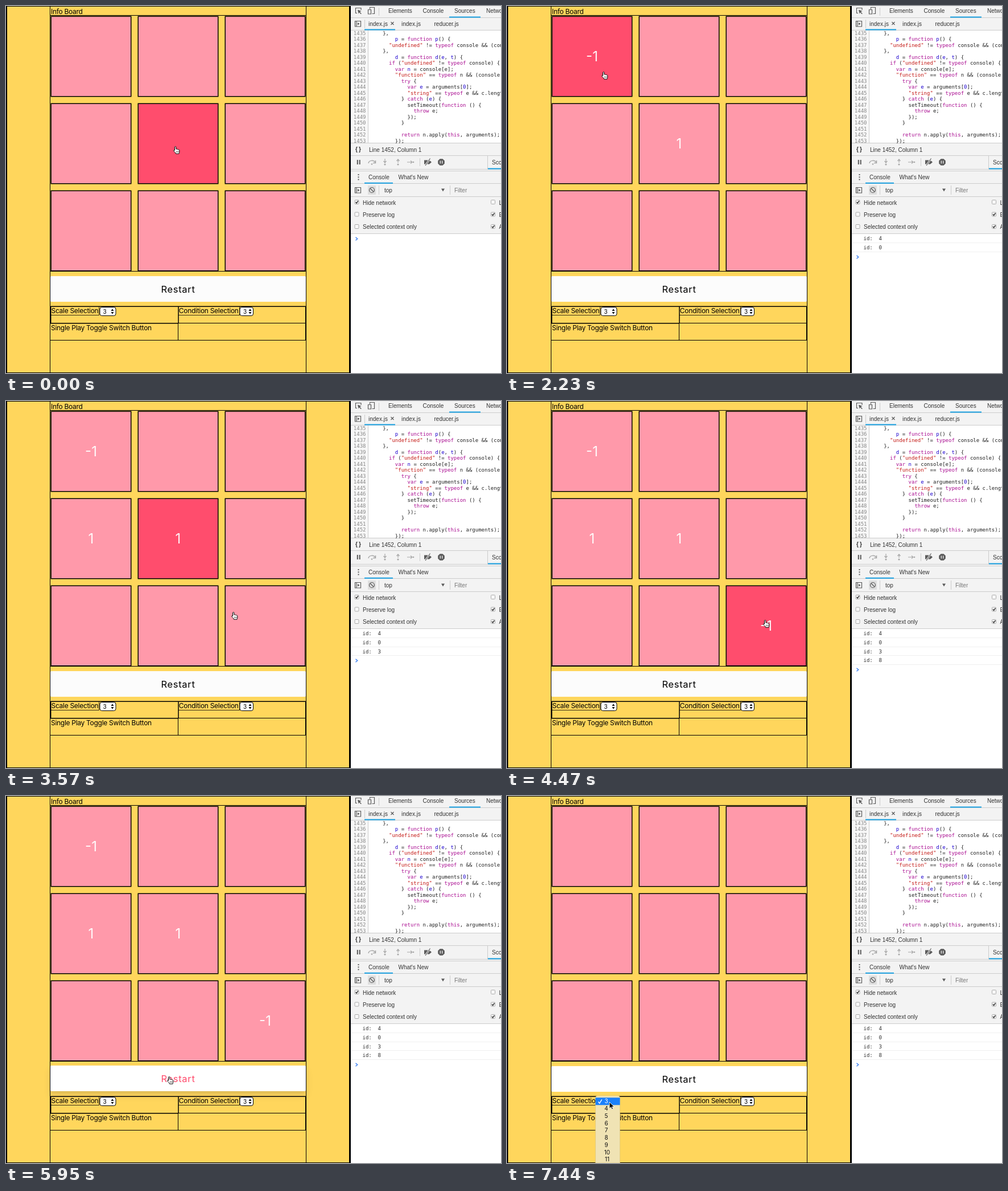
These frames come from a looping animation (870 by 644 pixels, 8 s). An HTML page:

```html
<!DOCTYPE html>
<html lang="en">
<head>
<meta charset="utf-8">
<title>Info Board</title>
<style>
html, body { margin: 0; width: 100%; height: 100%; overflow: hidden; background: #fff; }
#stage { position: relative; width: 870px; height: 644px; overflow: hidden; }
svg { position: absolute; left: 0; top: 0; }
text { white-space: pre; }

.page { font: 12px Inter, sans-serif; letter-spacing: -.29px; }
.tool { font: 10px "Liberation Sans", Arial, sans-serif; fill: #333; }
.mono { font: 9px "DejaVu Sans Mono", monospace; fill: #222; }
.num { fill: #888; text-anchor: end; }
.key { fill: #aa0d91; }
.str { fill: #c41a16; }
.def { fill: #1c00cf; }
.dim { fill: #777; }
.frame { fill: none; stroke: #000; }
.rule { fill: none; stroke: #ccc; }
.tab { fill: none; stroke: #1ba1e2; stroke-width: 2; }
.icon { fill: none; stroke: #5a5a5a; stroke-width: 1.2; }
.off { stroke: #a8a8a8; }
.mark { font: 24px Inter, sans-serif; fill: #fff; fill-opacity: .93; text-anchor: middle; }
.cell { fill: #ff99aa; stroke: #000; stroke-width: 1.5; }
.pick { font: 10px Inter, sans-serif; text-anchor: middle; }

.anim { animation: 8s step-end infinite; }
#hover { fill: #ff4d6d; animation-name: hover; }
#hand, #arrow { fill: #fff; stroke: #000; stroke-linejoin: round; }
#arrow { fill: #000; stroke: #fff; stroke-width: .9; visibility: hidden; animation-name: arrow; }
#hand { animation-name: hand; }
#cursor { animation-name: cursor; }
#menu { visibility: hidden; animation-name: menu; }
.mark { visibility: hidden; }

#restart {
  position: absolute; left: 78px; top: 474px; width: 449px; height: 45px;
  border-radius: 2px; background: #fcfcfc; color: #000; text-align: center;
  font: 16.5px/46px Inter, sans-serif; letter-spacing: .65px; animation-name: restart;
}
#console { position: absolute; left: 607px; top: 400px; width: 263px; height: 244px; background: #fff; }
#log { height: 0; overflow: hidden; animation-name: log; }
#log div {
  box-sizing: border-box; height: 15.75px; padding-left: 19.5px; border-bottom: 1px solid #f0f0f0;
  font: 9px/16px "DejaVu Sans Mono", monospace; color: #303030; white-space: pre;
}
#console svg { position: static; display: block; }

@keyframes hover {
  0% { transform: translate(153px, 153px); visibility: visible; }
  16.75% { visibility: hidden; }
  18.625% { transform: none; visibility: visible; }
  33.375% { transform: translate(0, 153px); }
  44.625% { transform: translate(153px, 153px); }
  46.5% { transform: translate(306px, 306px); }
  65.25% { visibility: hidden; }
  67% { transform: translate(153px, 306px); visibility: visible; }
  70.75%, 100% { transform: translate(153px, 306px); visibility: hidden; }
}
@keyframes cursor {
  0% { transform: translate(294px, 246px); }
  14.875% { transform: translate(276px, 226px); }
  16.75% { transform: translate(222px, 168px); }
  18.625% { transform: translate(192px, 140px); }
  20.375% { transform: translate(173px, 121px); }
  22.25% { transform: translate(166px, 115px); }
  33.375% { transform: translate(156px, 196px); }
  35.25% { transform: translate(156px, 254px); }
  44.625% { transform: translate(396px, 370px); }
  46.5% { transform: translate(441px, 381px); }
  48.375% { transform: translate(450px, 384px); }
  63.375% { transform: translate(425px, 405px); }
  65.25% { transform: translate(374px, 434px); }
  67% { transform: translate(326px, 452px); }
  68.875% { transform: translate(303px, 460px); }
  70.75% { transform: translate(291px, 477px); }
  72.5% { transform: translate(285px, 488px); }
  74.375% { transform: translate(283px, 492px); }
  83.75% { transform: translate(216px, 529px); }
  85.5% { transform: translate(174px, 549px); }
  87.375% { transform: translate(177px, 542px); }
  89.25% { transform: translate(179px, 538px); }
  91.125%, 100% { transform: translate(180px, 537px); }
}
@keyframes hand { 0% { visibility: visible; } 83.75%, 100% { visibility: hidden; } }
@keyframes arrow { 0% { visibility: hidden; } 83.75%, 100% { visibility: visible; } }
@keyframes menu { 0% { visibility: hidden; } 93%, 100% { visibility: visible; } }
@keyframes turn1 { 5.625% { visibility: visible; } 78.125%, 100% { visibility: hidden; } }
@keyframes turn2 { 27.875% { visibility: visible; } 78.125%, 100% { visibility: hidden; } }
@keyframes turn3 { 39% { visibility: visible; } 78.125%, 100% { visibility: hidden; } }
@keyframes turn4 { 55.875% { visibility: visible; } 78.125%, 100% { visibility: hidden; } }
@keyframes log {
  0% { height: 0; }
  5.625% { height: 15.75px; }
  27.875% { height: 31.5px; }
  39% { height: 47.25px; }
  55.875%, 100% { height: 63px; }
}
@keyframes restart {
  0% { color: #000; background: #fcfcfc; transform: none; box-shadow: none; }
  70.75% { color: #9b3145; background: #fff; transform: translateY(-.6px); box-shadow: 0 4px 8px rgba(50, 50, 93, .07); }
  72.5% { color: #ff4d6d; transform: translateY(-1px);
    box-shadow: 0 7px 14px rgba(50, 50, 93, .1), 0 3px 6px rgba(0, 0, 0, .08); }
  85.5% { color: #9b3145; transform: translateY(-.6px); box-shadow: 0 4px 8px rgba(50, 50, 93, .07); }
  87.375%, 100% { color: #000; background: #fff; transform: none; box-shadow: none; }
}
</style>
</head>
<body>
<div id="stage">
<svg width="870" height="644" viewBox="0 0 870 644">
  <defs>
    <g id="panel">
      <path d="M.5 .5h10v9.500h-10zM3 .5v9.500"/>
      <path d="M5 3l3.500 2.300L5 7.600z" fill="#5a5a5a" stroke="none"/>
    </g>
    <rect id="box" x=".5" y=".5" width="7" height="7" rx="1" fill="#f8f8f8" stroke="#aaa"/>
    <path id="tick" d="M2 4l1.600 2L6.500 1.800" fill="none" stroke="#333" stroke-width="1.400"/>
    <path id="sort" d="M0 -1L2.500 -4.500L5 -1zM0 1L2.500 4.500L5 1z"/>
  </defs>

  <!-- game page -->
  <rect width="606" height="644" fill="#ffd65c"/>
  <path d="M0 0h2v644h-2zM603 0h3v644h-3zM0 0h606v1h-606zM0 643h606v1h-606z"/>
  <path class="frame" d="M77.500 0V644M527.500 0V644M78 16.500H527M78 465.500H527"/>
  <g id="cells"></g>
  <rect id="hover" class="anim" x="80" y="19" width="139" height="139"/>
  <text class="mark anim" style="animation-name:turn2" x="149.500" y="97.300">-1</text>
  <text class="mark anim" style="animation-name:turn3" x="149.500" y="250.300">1</text>
  <text class="mark anim" style="animation-name:turn1" x="302.500" y="250.300">1</text>
  <text class="mark anim" style="animation-name:turn4" x="455.500" y="403.300">-1</text>

  <path class="frame" stroke-width="1.500" d="M78.500 527.200H527M78.700 527V557M303 527V557M78 556.800H303"/>
  <path class="frame" d="M526.500 527V587M303 556.500H527M78 586.500H527M302.500 557V587"/>
  <path class="frame" stroke-width=".800" d="M79 542.500H163.600V528M303 542.500H410.500V528"/>
  <g class="page">
    <text x="79" y="13.500">Info Board</text>
    <text x="79.500" y="539.300">Scale Selection</text>
    <text x="303.800" y="539.300">Condition Selection</text>
    <text x="79" y="569.300">Single Play Toggle Switch Button</text>
  </g>
  <g class="pick">
    <rect class="frame" x="165" y="528.500" width="28" height="15" rx="3.500" style="fill:#fff"/>
    <rect class="frame" x="411" y="528.500" width="23.500" height="15" rx="3.500" style="fill:#fff"/>
    <text x="173.500" y="539.600">3</text><use href="#sort" x="184.500" y="536"/>
    <text x="420" y="539.600">3</text><use href="#sort" x="426.500" y="536"/>
  </g>

  <!-- developer tools -->
  <rect x="606" width="264" height="400" fill="#f3f3f3"/>
  <rect x="606" y="43" width="264" height="197" fill="#fff"/>
  <rect x="606" y="43" width="30" height="197" fill="#f7f7f7"/>
  <path class="rule" d="M606 20.500H870M606 42.500H870M636.500 43V240M606 240.500H870M606 262.500H870M606 286.500H870M606 289.500H870M606 311.500H870M606 334.500H870M606 399.500H870M655.500 3V17M630.500 24V39M727.500 267V281M846.500 263V286M655.500 315V331M780.500 315V331"/>
  <path class="tab" d="M779 19.500H834M630 41.500H684M847 285.500H870M630 310.700H680"/>
  <g class="tool">
    <text x="672" y="12.300">Elements</text>
    <text x="732.500" y="12.300">Console</text>
    <text x="788" y="12.300">Sources</text>
    <text x="844" y="12.300">Network</text>
    <text x="637" y="34.500">index.js</text>
    <text x="695" y="34.500">index.js</text>
    <text x="752.500" y="34.500">reducer.js</text>
    <text x="638" y="255.800">Line 1452, Column 1</text>
    <text x="854" y="277.800">Scope</text>
    <text x="637" y="303.800">Console</text>
    <text x="689.500" y="303.800">What's New</text>
    <text x="665" y="326.600">top</text>
    <text x="788" y="327" class="dim">Filter</text>
    <text x="627" y="348.500">Hide network</text>
    <text x="627" y="370">Preserve log</text>
    <text x="627" y="391.300">Selected context only</text>
    <text x="866.500" y="348.500">L</text>
    <text x="866.500" y="370">E</text>
    <text x="866.500" y="391.300">A</text>
    <text x="614" y="255.300" font-weight="bold" letter-spacing="2">{}</text>
  </g>
  <use href="#box" x="612.500" y="340"/><use href="#tick" x="612.500" y="340"/>
  <use href="#box" x="612.500" y="361.500"/>
  <use href="#box" x="612.500" y="383"/>
  <use href="#box" x="852" y="340"/>
  <use href="#box" x="852" y="361.500"/><use href="#tick" x="852" y="361.500"/>
  <use href="#box" x="852" y="383"/><use href="#tick" x="852" y="383"/>

  <rect x="636" y="315" width="14" height="16" fill="#dedede"/>
  <g class="icon">
    <path d="M617 12.500h-2.500v-9h9.500v3.500"/>
    <path d="M618 6.500l6.500 2.600-2.700 1.100 3 3-1 1-3-3-1.100 2.600z" fill="#5a5a5a" stroke="none"/>
    <path d="M639.500 5.500v-3h8v11h-4M636.500 6.500h5v7.500h-5z"/>
    <use href="#panel" x="613" y="26"/>
    <use href="#panel" x="613" y="318"/>
    <path d="M676.500 28l5 5M681.500 28l-5 5"/>
    <path d="M617.800 270v8M621.700 270v8" stroke-width="2"/>
    <path class="off" d="M637 276c1-6 10-6 12-1M649.500 271v4.500h-4.500" stroke-width="1.500"/>
    <path class="off" d="M666 268v6M663.500 272l2.500 3 2.500-3M689 275v-6M686.500 272l2.500-3 2.500 3M705 274h8M711 271.500l3 2.500-3 2.500"/>
    <g fill="#a8a8a8" stroke="none">
      <circle cx="666" cy="278" r="1.600"/><circle cx="689" cy="278" r="1.600"/><circle cx="716" cy="274" r="1.300"/>
      <circle cx="643" cy="277.500" r="1.300"/>
    </g>
    <path d="M735 270.500h9l4 3.500-4 3.500h-9z" fill="#5a5a5a" stroke="none"/>
    <path d="M736.500 280.500l9-13" stroke="#f3f3f3" stroke-width="3"/>
    <path d="M737 280l8.500-12.500"/>
    <path d="M762.600 268.200h4.800l3.400 3.400v4.800l-3.400 3.400h-4.800l-3.400-3.400v-4.800z" fill="#5a5a5a" stroke="none"/>
    <path d="M763.300 271.500v5M766.700 271.500v5" stroke="#fff"/>
    <circle cx="643" cy="323" r="4.500"/><path d="M640 320l6 6"/>
    <path d="M619.500 295v11" stroke-width="2" stroke-dasharray="2 2.300"/>
    <path d="M765 320.500h6l-3 5z" fill="#5a5a5a" stroke="none"/>
  </g>
  <g id="code" class="mono"></g>
</svg>

<div id="restart" class="anim">Restart</div>

<div id="console">
  <div id="log" class="anim"><div>id:  4</div><div>id:  0</div><div>id:  3</div><div>id:  8</div></div>
  <svg width="20" height="16"><path d="M7.500 5.800l3.200 2.700-3.200 2.700" fill="none" stroke="#367cf1" stroke-width="1.400"/></svg>
</div>

<svg width="870" height="644" viewBox="0 0 870 644">
  <g id="menu" class="anim">
    <path d="M155.500 644V530a4 4 0 0 1 4-4h35a4 4 0 0 1 4 4V644z" fill="#f0e3b4" stroke="#d9c27a" stroke-width=".600"/>
    <rect x="155.500" y="529.300" width="43" height="13" fill="#1a80fb"/>
    <path d="M160.500 536.500l2.200 2.800 4-6.800" fill="none" stroke="#fff" stroke-width="1.400"/>
    <g id="options" class="pick"></g>
  </g>
  <g id="cursor" class="anim">
    <g id="hand" class="anim">
      <path d="M2.500 7.500V1.800a1.200 1.200 0 0 1 2.400 0V5.200c.8-.5 1.900-.3 2.200.4.800-.4 1.700-.1 2 .6.900-.3 1.700.2 1.700 1.200v2.800c0 1.200-.8 1.700-.8 3H4.500C4.200 11.300 2 10 .8 8.300.1 7.100 1.300 6.200 2.500 7.500Z"/>
      <path d="M5.500 8.500v2.500M7.300 8.500v2.500M9 8.500v2.500" stroke-width=".600"/>
    </g>
    <path id="arrow" class="anim" d="M0 0V11.500L2.700 9L4.500 13L6.500 12.100L4.700 8.300H8.300Z"/>
  </g>
</svg>
</div>

<script>
const $ = id => document.getElementById(id);
const text = (x, y, body, cls = "") => `<text x="${x}" y="${y}" class="${cls}">${body}</text>`;
const repeat = (n, draw) => Array.from({ length: n }, (_, i) => draw(i)).join("");

$("cells").innerHTML = repeat(9, i =>
  `<rect class="cell" x="${79.25 + 153 * (i % 3)}" y="${18.25 + 153 * Math.floor(i / 3)}" width="140.5" height="140.5"/>`);

$("options").innerHTML = repeat(9, i =>
  `<g fill="${i ? "#111" : "#fff"}">${text(i < 7 ? 174.5 : 176, 539.4 + 12.75 * i, i + 3)}</g>`);

const source = `    },
        p = function p() {
      "undefined" != typeof console && (console
    },
        d = function d(e, t) {
      if ("undefined" != typeof console) {
        var n = console[e];
        "function" == typeof n && (console
          try {
            var e = arguments[0];
            "string" == typeof e && c.length
          } catch (e) {
            setTimeout(function () {
              throw e;
            });
          }

          return n.apply(this, arguments);
        });`;

const rules = /("\w+")|\b(function|typeof|if|var|try|catch|throw|return|this)\b|(\b\d+\b|\b[nedtp]\b(?= = |, t|\) \{)|\b[dp](?=\())/g;
const paint = line => line.replace(/&/g, "&amp;").replace(rules, (word, str, key) =>
  `<tspan class="${str ? "str" : key ? "key" : "def"}">${word}</tspan>`);

$("code").innerHTML = source.split("\n").map((line, i) => {
  const y = 50.8 + 10.5 * i, indent = line.search(/\S|$/);
  return text(632.5, y, 1435 + i, "num") + text(640.5 + 5.42 * indent, y, paint(line.trim()));
}).join("");
</script>
</body>
</html>
```
